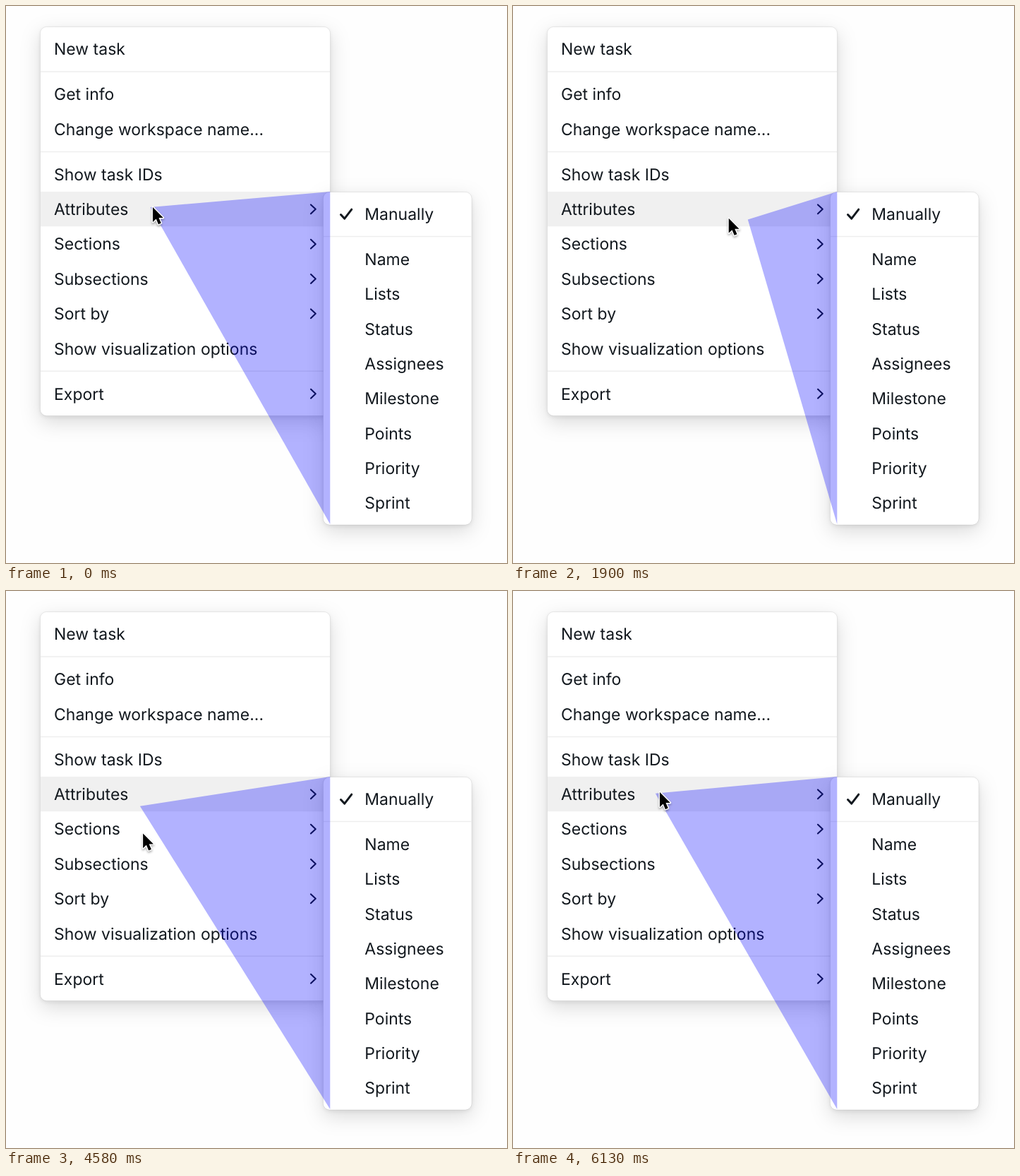
Recreate the animation shown at these times as an HTML page. Size 710 by 789 pixels, loop 6.38 s.

```html
<!DOCTYPE html>
<html lang="en">
<head>
<meta charset="utf-8">
<title>Menu safe triangle</title>
<style>
  html, body { margin: 0; width: 100%; height: 100%; overflow: hidden; background: #fefefe; }
  svg { display: block; width: 710px; height: 789px; }
  text {
    font: 400 23px Inter, sans-serif;
    font-optical-sizing: none;
    text-rendering: geometricPrecision;
    fill: #12181e;
  }
  .card {
    fill: #fff; stroke: rgba(0, 0, 0, .08);
    filter: drop-shadow(0 2px 3px rgba(0, 0, 0, .08)) drop-shadow(0 9px 14px rgba(0, 0, 0, .14));
  }
  .rule { stroke: #eee; stroke-width: 1.6; }
  .mark { fill: none; stroke: #12181e; stroke-width: 2.1; stroke-linecap: round; stroke-linejoin: round; }
  .cursor { filter: drop-shadow(0 2px 1.5px rgba(0, 0, 0, .3)); }
</style>
</head>
<body>
<svg viewBox="0 0 710 789">
  <g id="menu">
    <rect class="card" x="48.5" y="29.5" width="411" height="551" rx="9"/>
    <rect id="hover" x="49" width="410" height="49.3" fill="#f0f0f0"/>
  </g>
  <g id="sub">
    <rect class="card" x="449.5" y=".5" width="210.5" height="471.5" rx="9"/>
    <path class="mark" style="stroke-width:3" d="M474.5 32.5l5.3 5.6 10-13"/>
  </g>
  <path id="zone" fill="#00f" fill-opacity=".3"/>
  <g id="arrow" class="cursor">
    <path transform="scale(.95)" d="M0 0V22L5 17.3L8.4 25.4L12.4 23.7L9 15.8H15.6Z" stroke="#fff" stroke-width="3" stroke-linejoin="round" paint-order="stroke"/>
  </g>
  <g id="hand" class="cursor" fill="#fff" stroke="#111" stroke-width="1.8" stroke-linecap="round" stroke-linejoin="round">
    <path d="M-3 2C-3.6-1.5 1-2.5 2 .8L4 8.5c.8-1.8 3.6-1.6 4.2.5 1-1.2 3.4-.8 3.8 1 1.6-.8 3.4.2 3.6 2 .4 3 .6 5-.8 8l-.8 4.5H3.5C1 20.5-3 17.5-6.5 14-8.5 11.5-5.5 9.5-3.2 11L-.6 12.4Z"/>
    <path fill="none" d="M4.5 15l.5 5.5M8 15l.3 5.5M11.5 15v5.5"/>
  </g>
</svg>
<script>
  const LOOP = 6380, LAG = 65, TOP = 263, ROW = 49.35, GAP = 14.7, HEIGHT = 471;
  const $ = id => document.getElementById(id);
  const menu = $('menu'), sub = $('sub'), hover = $('hover'), zone = $('zone'), arrow = $('arrow'), hand = $('hand');

  function add(parent, tag, attrs, label) {
    const el = document.createElementNS('http://www.w3.org/2000/svg', tag);
    for (const k in attrs) el.setAttribute(k, attrs[k]);
    if (label) el.textContent = label;
    parent.appendChild(el);
  }

  // stacks rows in groups split by rules; a trailing ">" adds a chevron
  function list(parent, x, mid, x1, x2, groups) {
    groups.forEach((group, i) => {
      if (i) {
        const y = mid - (ROW - GAP) / 2 - GAP / 2;
        add(parent, 'line', { class: 'rule', x1, x2, y1: y - GAP / 2, y2: y - GAP / 2 });
      }
      for (const item of group.split('|')) {
        add(parent, 'text', { x, y: mid + 8.3 }, item.replace('>', ''));
        if (item.endsWith('>')) add(parent, 'path', { class: 'mark', d: `M432 ${mid - 6.4}l6.8 6.4-6.8 6.4` });
        mid += ROW;
      }
      mid += GAP;
    });
  }
  list(menu, 68, 61, 49, 459, [
    'New task',
    'Get info|Change workspace name...',
    'Show task IDs|Attributes>|Sections>|Subsections>|Sort by>|Show visualization options',
    'Export>'
  ]);
  list(sub, 508.3, 31.5, 450, 659.5, [
    'Manually',
    'Name|Lists|Status|Assignees|Milestone|Points|Priority|Sprint'
  ]);

  // pointer trips: start, end, and where it comes to rest
  const home = [208, 284];
  const trips = [
    [30, 860, 546, 641],
    [860, 1325, 510, 312],
    [1325, 2247, 211, 294],
    [2750, 3360, 371, 375],
    [4030, 4450, 193, 287],
    [4450, 4760, 196, 431],
    [4857, 5130, 200, 288],
    [5130, 5630, 205, 286],
    [6050, 6130, ...home]
  ];
  function pointer(t) {
    let [x, y] = home;
    for (const [from, to, tx, ty] of trips) {
      const u = Math.max(0, Math.min(1, (t - from) / (to - from)));
      const s = u * u * (3 - 2 * u);
      x += (tx - x) * s;
      y += (ty - y) * s;
    }
    return [x, y];
  }

  const show = (el, on) => el.setAttribute('visibility', on ? 'visible' : 'hidden');
  const move = (el, x, y) => el.setAttribute('transform', `translate(${x} ${y})`);

  function draw(t) {
    t = Math.min(t, 6130);
    const [x, y] = pointer(t), [px, py] = pointer(t - LAG);
    const ax = px - 3.5, ay = py + 1;
    // the safe triangle keeps the first row open on the diagonal trips
    const row = t < 3250 ? 0 : Math.max(0, Math.min(3, Math.floor((ay - TOP) / ROW)));
    const top = TOP + row * ROW - (row ? .4 : 0), inside = ax > 449;
    hover.setAttribute('y', TOP + row * ROW);
    move(sub, 0, top);
    zone.setAttribute('d', `M${ax} ${ay}L459.3 ${top}V${top + HEIGHT}Z`);
    show(zone, !inside);
    show(arrow, !inside);
    show(hand, inside);
    move(arrow, x, y + 1);
    move(hand, x, y);
  }

  const start = performance.now();
  function tick() {
    draw((performance.now() - start) % LOOP);
    requestAnimationFrame(tick);
  }
  tick();
</script>
</body>
</html>
```
